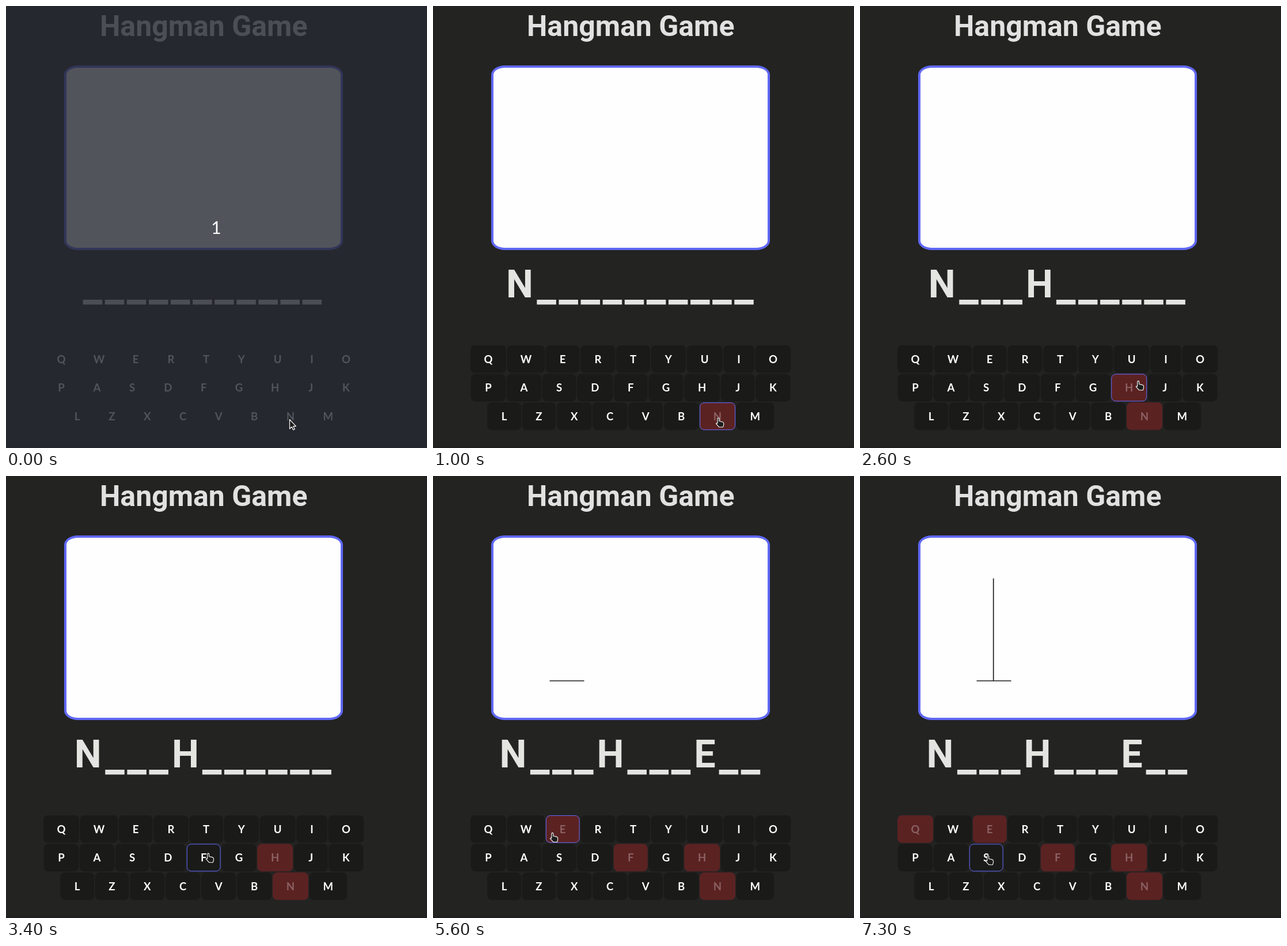
Write an HTML page that moves like this. It is 731x766 px and loops after 8 s.

```html
<!DOCTYPE html>
<html lang="en">
<head>
<meta charset="utf-8">
<title>Hangman Game</title>
<style>
  html, body { margin: 0; width: 100%; height: 100%; overflow: hidden; background: #232322; }
  svg { display: block; width: 731px; height: 766px; }
  text { font-family: Roboto, "Noto Sans", sans-serif; font-weight: 700; text-anchor: middle; }
  .title { font-size: 50px; fill: #e1e1e1; }
  .word { font-size: 66.5px; fill: #e4e4e1; }
  .key { font-family: Lato, sans-serif; font-size: 18.6px; }
  .count { font-family: Lato, sans-serif; font-size: 30px; font-weight: 400; fill: #fff; }
</style>
</head>
<body>
<svg id="stage" viewBox="0 0 731 766"></svg>
<script>
const LOOP = 8000, TICK = 100, FADE = 250, STEP = 10, MID = 343.2;
const stage = document.getElementById('stage');

function set(el, attrs) {
  for (const k in attrs) el.setAttribute(k, attrs[k]);
}
function add(tag, attrs, parent = stage, text = '') {
  const el = document.createElementNS('http://www.w3.org/2000/svg', tag);
  set(el, attrs);
  el.textContent = text;
  parent.appendChild(el);
  return el;
}
const show = (el, on) => set(el, { visibility: on ? 'visible' : 'hidden' });
const sum = (list, f) => list.reduce((total, item) => total + f(item), 0);

// Page
add('rect', { width: 731, height: 766, fill: '#232322' });
add('rect', { y: 763, width: 731, height: 3, fill: '#1f1f1f' });
add('rect', { x: 730, width: 1, height: 766, fill: '#1d1d20' });
add('text', { x: MID, y: 52, class: 'title' }, stage, 'Hangman Game');

// Drawing board
add('rect', { x: 101, y: 103, width: 484, height: 320, rx: 24, ry: 16, fill: '#6068f4' });
add('rect', { x: 105, y: 107, width: 476, height: 312, rx: 20, ry: 12, fill: '#fefefe' });
const pen = { stroke: '#1c1c1c', 'stroke-width': 1.7 };
const base = add('path', { d: 'M202.5 355H262.5', ...pen });
const post = add('path', { d: 'M231.7 177.5V355', ...pen });

// Keyboard: every row is centred, every key is as wide as its letter needs
const GAP = 1.6, KEY_H = 47.8, ROW_H = 49.5;

function keyWidth(name) {
  if (name === 'I') return 53.6;
  if ('WM'.includes(name)) return 65.6;
  if ('DHNOQU'.includes(name)) return 62;
  return 'EFJLSTZ'.includes(name) ? 58.8 : 60.4;
}

const keys = ['QWERTYUIO', 'PASDFGHJK', 'LZXCVBNM'].flatMap((row, r) => {
  const y = 588 + r * ROW_H, names = [...row];
  let left = MID - (sum(names, n => keyWidth(n) + GAP) - GAP) / 2;
  return names.map(name => {
    const w = keyWidth(name), x = left;
    left += w + GAP;
    return {
      name, x, y, w,
      face: add('rect', { x, y, width: w, height: KEY_H, rx: 8 }),
      label: add('text', { x: x + w / 2, y: y + 30.5, class: 'key' }, stage, name),
      edge: add('rect', {
        x: x + .5, y: y + .5, width: w - 1, height: KEY_H - 1, rx: 7.5,
        fill: 'none', stroke: '#646cff'
      })
    };
  });
});

const pressed = { N: 600, H: 2500, F: 3500, E: 4800, Q: 6400 };

// Hidden word: letters by slot, with the time each shows up and its advance
const SLOTS = 11, BLANK = { w: 38.1 }, SPACE = 4.6;
const found = {
  0: { ch: 'N', at: 700, w: 55.3 },
  4: { ch: 'H', at: 2600, w: 54.3 },
  8: { ch: 'E', at: 4800, w: 44.8 }
};
const word = add('g', {});

function drawWord(t) {
  word.replaceChildren();
  const slots = Array.from({ length: SLOTS }, (_, i) => t >= found[i]?.at ? found[i] : BLANK);
  let x = MID - sum(slots, s => s.w) / 2;
  for (const { ch, w } of slots) {
    const inner = w - SPACE;
    if (ch) add('text', { x: x + inner / 2, y: 505.3, class: 'word' }, word, ch);
    else add('rect', { x, y: 509, width: inner, height: 8.4, fill: '#e4e4e1' }, word);
    x += w;
  }
}

// Countdown veil
const veil = add('g', {});
add('rect', { width: 731, height: 766, fill: '#272a32', opacity: .8 }, veil);
add('text', { x: 365, y: 394.5, class: 'count' }, veil, '1');

// Pointers, with the hot spot at the origin
const ink = { fill: '#1c1c1c', stroke: '#fff', 'stroke-width': 1.2, 'stroke-linejoin': 'round' };
const arrow = add('path', { d: 'M0 0V16L3.8 12.6 6.3 18 8.8 16.8 6.4 11.6H11Z', ...ink });
const hand = add('path', {
  d: 'M-1.6 9V1.6a1.6 1.6 0 0 1 3.2 0V6l6 1.2q2.4.6 2.4 3V12q0 2-1.4 5H1.5L-4.2 10.6q.6-1.8 2.6-.6z',
  ...ink
});

// A stop is a key, an offset from its centre, and the times of the trip there
function stop(name, dx, dy, leave, arrive) {
  const k = keys.find(k => k.name === name);
  return { x: k.x + k.w / 2 + dx, y: k.y + KEY_H / 2 + dy, leave, arrive };
}
const stops = [
  stop('N', -1, 5, 0, 1),
  stop('O', 8, 0, 950, 1500),
  stop('H', 16, -12, 1950, 2350),
  stop('F', 8, -8, 2750, 3250),
  stop('S', 11, -10, 3850, 4190),
  stop('E', -16, 6, 4200, 4550),
  stop('Q', 4, 6, 5550, 6200),
  stop('S', 3, -4, 6850, 7150)
];

function pointer(t) {
  const i = stops.findLastIndex(s => t >= s.leave);
  const to = stops[i], from = stops[i - 1] || to;
  const u = Math.min(1, (t - to.leave) / (to.arrive - to.leave));
  const s = u * u * (3 - 2 * u);
  return { x: from.x + (to.x - from.x) * s, y: from.y + (to.y - from.y) * s };
}

const over = (k, p) =>
  p.x >= k.x && p.x < k.x + k.w && p.y >= k.y && p.y < k.y + KEY_H;

// Border strength of every key after following the pointer up to time t
function glow(t) {
  const level = keys.map(() => 0);
  for (let s = 30; s < t; s += STEP) {
    const p = pointer(s);
    keys.forEach((k, i) => {
      const next = level[i] + (over(k, p) ? STEP : -STEP) / FADE;
      level[i] = Math.min(1, Math.max(0, next));
    });
  }
  return level;
}

function draw(t) {
  const waiting = t < 100, level = glow(t);
  keys.forEach((k, i) => {
    const off = t >= pressed[k.name];
    set(k.face, { fill: off ? '#5b2222' : '#1a1a19' });
    set(k.label, { fill: off ? '#8b6163' : '#fff' });
    set(k.edge, { opacity: level[i] });
    show(k.face, !waiting);
  });
  drawWord(t);
  show(base, t >= 3600);
  show(post, t >= 6500);

  show(veil, waiting);
  show(arrow, waiting);
  show(hand, !waiting);
  const { x, y } = pointer(t);
  set(arrow, { transform: `translate(${x - .5} ${y + .8})` });
  set(hand, { transform: `translate(${x} ${y + .5}) scale(.93)` });
}

// The screen refreshes ten times a second
let last = -1;
const start = performance.now();
function frame() {
  const now = Math.max(0, performance.now() - start) % LOOP;
  const t = Math.floor(now / TICK) * TICK;
  if (t !== last) draw(last = t);
  requestAnimationFrame(frame);
}
frame();
</script>
</body>
</html>
```
